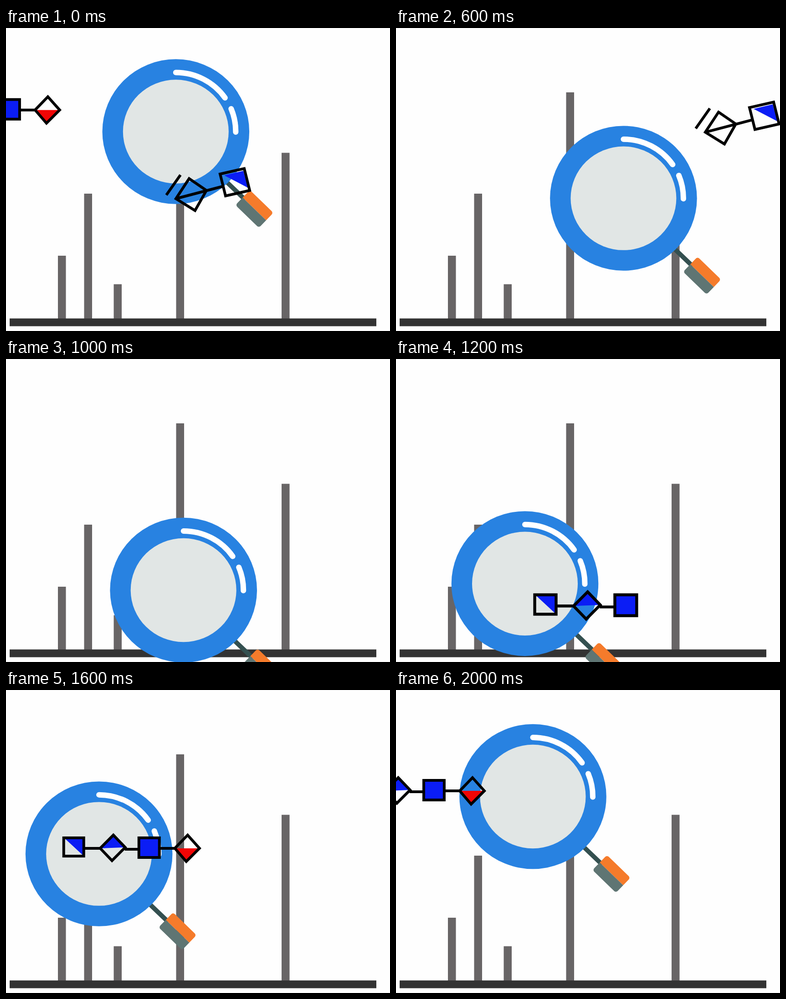
An HTML page that plays this animation: 843 by 664 pixels, repeating every 2100 ms.

```html
<!DOCTYPE html>
<html lang="en">
<head>
<meta charset="utf-8">
<title>Magnifier over spectrum</title>
<style>
  html, body { margin: 0; width: 100%; height: 100%; overflow: hidden; background: #fefefe; }
  svg { display: block; width: 843px; height: 664px; }
  .ink { fill: none; stroke: #000; stroke-width: 6; }
  .blue { fill: #0b1df5; }
  .red { fill: #f00505; }
  .shine { fill: none; stroke: #fff; stroke-width: 12; stroke-linecap: round; }
</style>
</head>
<body>
<svg viewBox="0 0 843 664">
  <defs>
    <g id="trio">
      <path class="blue" d="M29 271H68V307Z"/>
      <path class="blue" d="M106 292L135 263L160 290Z"/>
      <path class="blue" d="M191 269h45v43h-45z"/>
      <path class="ink" d="M26 269h44v40h-44zM72 292H106M106 292L135 263L161 290L132 319ZM160 294H190M191 269h45v43h-45z"/>
    </g>
    <clipPath id="grip"><rect x="-36" y="-23" width="72" height="46" rx="6"/></clipPath>
  </defs>
  <rect width="843" height="664" fill="#fefefe"/>
  <path d="M0 .5H843M0 663.5H843" stroke="#f0f0f0"/>
  <path fill="#686566" d="M114 499h17.5v138h-17.5zM171.5 363h17.5v274h-17.5zM236.5 561.5h17.5v76h-17.5zM373.5 141h17.5v496h-17.5zM605 273.5h17.5v364h-17.5z"/>
  <rect x="8" y="636.5" width="805" height="17" fill="#333"/>

  <g id="lens">
    <path d="M108 107L152 149" stroke="#345050" stroke-width="10"/>
    <g transform="translate(172.5 169.5) rotate(44)" clip-path="url(#grip)">
      <rect x="-36" y="-23" width="72" height="23" fill="#f57b2b"/>
      <rect x="-36" width="72" height="23" fill="#5f7573"/>
    </g>
    <ellipse rx="161.3" ry="158.7" fill="#2882e1"/>
    <ellipse rx="116" ry="113.7" fill="#e1e6e5"/>
    <path class="shine" d="M0 -129.5A132 130 0 0 1 108 -74M121.5 -50A132 130 0 0 1 131.5 1"/>
  </g>

  <g id="tilted">
    <path class="blue" d="M479 323L521 313L531 350Z"/>
    <path class="ink" stroke-width="7" d="M383 322L352 366M402 330L440 356L415 400L373 374ZM373 374L476 347M470 320L523 308L535 356L482 368Z"/>
  </g>
  <use id="falling" href="#trio"/>
  <g id="chain">
    <use href="#trio"/>
    <path class="red" d="M270 292H324L295 321Z"/>
    <path class="ink" d="M238 292H270M270 292L298 263L324 292L295 321Z"/>
  </g>
</svg>
<script>
  const LOOP = 21, STEP = 100;
  const hub = { x: 352, y: 365 };
  // step, lens centre x, y
  const stops = [
    [0, 372.8, 227], [4, 485, 302], [8, 478, 442.8], [12, 283, 492.2],
    [14, 218, 431], [18, 226, 290], [20, 300.5, 233.5], [21, 372.8, 227]
  ];

  // Polar positions around the hub, with the angle always growing
  let last = -Infinity;
  const orbit = stops.map(([n, x, y]) => {
    const dx = x - hub.x, dy = y - hub.y;
    let a = Math.atan2(dy, dx);
    while (a < last) a += 2 * Math.PI;
    last = a;
    return { n, a, r: Math.hypot(dx, dy) };
  });

  const el = id => document.getElementById(id);
  const lens = el("lens"), tilted = el("tilted"), falling = el("falling"), chain = el("chain");

  function place(node, x, y, scale = 1) {
    node.setAttribute("transform", `translate(${x} ${y}) scale(${scale})`);
  }

  function show(node, on) {
    node.style.display = on ? "" : "none";
  }

  function lensAt(n) {
    const i = orbit.findIndex(p => p.n > n);
    const p = orbit[i - 1], q = orbit[i];
    const k = (n - p.n) / (q.n - p.n);
    const a = p.a + (q.a - p.a) * k, r = p.r + (q.r - p.r) * k;
    return [hub.x + r * Math.cos(a), hub.y + r * Math.sin(a)];
  }

  function draw(n) {
    place(lens, ...lensAt(n));

    const out = 36.6 * n + 2.4 * n * n;
    place(tilted, out, -0.476 * out);
    show(tilted, n < 10);

    const f = n - 12, size = 1.066;
    place(falling, 328 - 48 * size, 538 - 289 * size + 46.25 * f + f * f, size);
    show(falling, n >= 11 && n < 16);

    // The long chain leaves across the loop seam
    const c = (n < 5 ? n + LOOP : n) - 18;
    const left = 57.7 * c + 3.67 * c * c;
    place(chain, -left, -0.545 * left);
    show(chain, c >= -3);
  }

  const start = performance.now();
  function tick() {
    draw(Math.floor((performance.now() - start) / STEP) % LOOP);
    requestAnimationFrame(tick);
  }
  tick();
</script>
</body>
</html>
```
